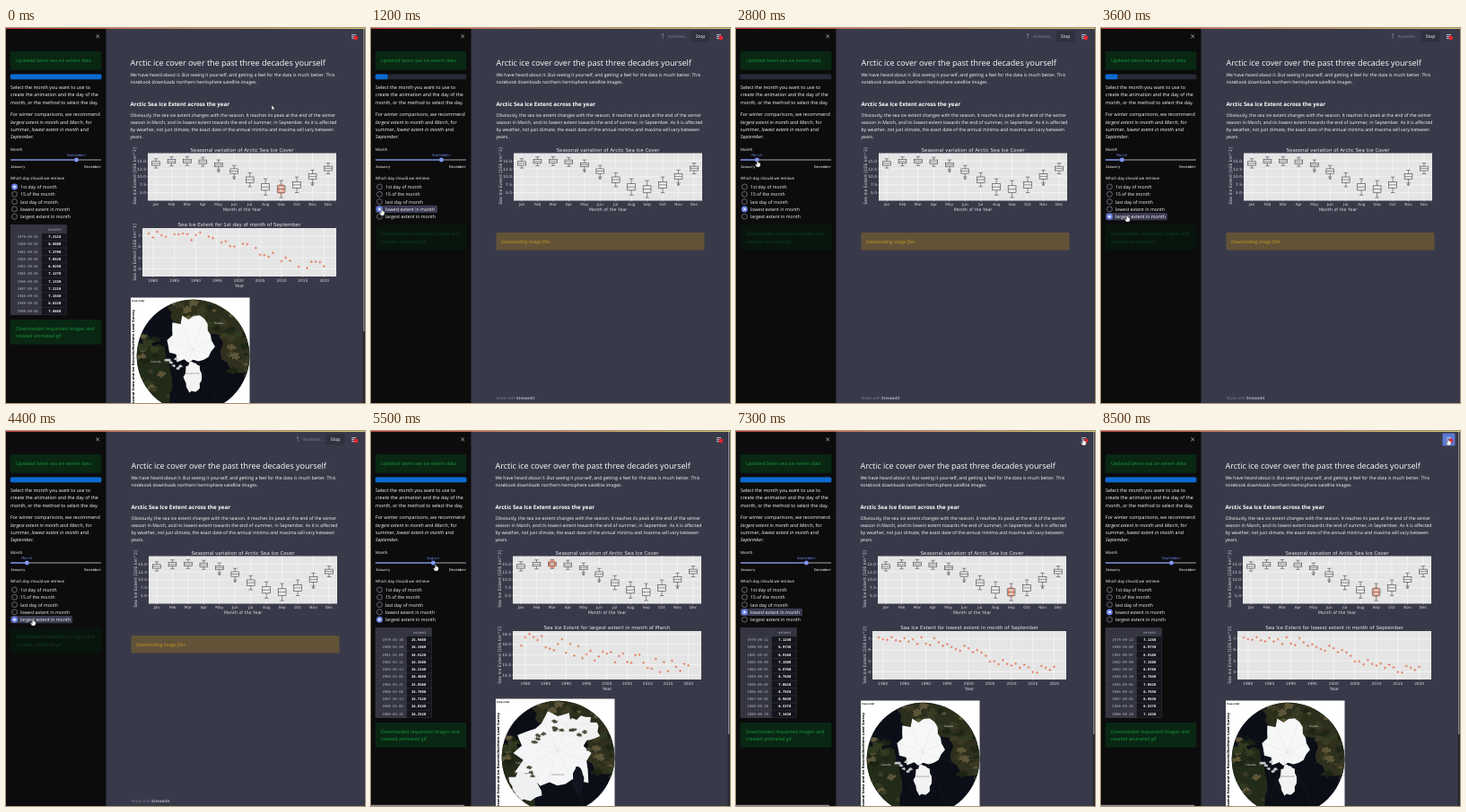
These frames come from a looping animation (400 px wide and 418 px high, 8.6 s). An HTML page with a canvas:

```html
<!DOCTYPE html>
<html lang="en">
<head>
<meta charset="utf-8">
<title>Arctic ice cover</title>
<style>
html, body { margin: 0; width: 100%; height: 100%; overflow: hidden; background: #393a49; }
canvas { display: block; width: 400px; height: 418px; }
</style>
</head>
<body>
<canvas id="stage"></canvas>
<script>
const W = 400, H = 418, LOOP = 8600;
const canvas = document.getElementById('stage');
const dpr = window.devicePixelRatio || 1;
canvas.width = W * dpr;
canvas.height = H * dpr;
const g = canvas.getContext('2d');
g.scale(dpr, dpr);
g.textRendering = 'geometricPrecision';

const SANS = '"Open Sans", "Noto Sans", sans-serif';
const PLOT = '"DejaVu Sans", sans-serif';
const MONO = '"DejaVu Sans Mono", monospace';
const MONTHS = ['January', 'February', 'March', 'April', 'May', 'June', 'July',
  'August', 'September', 'October', 'November', 'December'];
const DAYS = ['1st day of month', '15 of the month', 'last day of month',
  'lowest extent in month', 'largest extent in month'];
const RED = '#e2572f', BLUE = '#7088ee', PALE = '#d8d8de', GREEN = '#1c9a3e', GREEN_BOX = '#092713';

function rand(n, seed = 1) {
  const v = Math.sin(n * 12.9898 + seed * 78.233) * 43758.5453;
  return v - Math.floor(v);
}

// yearly extent: a falling trend with seeded scatter
function series(seed, trend, gaps = 0) {
  const out = [];
  for (let year = 1979; year <= 2020; year++) {
    if (year > 1980 && rand(year, seed + 9) < gaps) continue;
    const day = gaps ? 1 : 1 + Math.floor(rand(year, seed + 5) * 22);
    out.push({ year, day, value: trend(year) + (rand(year, seed) - 0.5) * 0.8 });
  }
  return out;
}

const summer = year => 6.95 - 3 / (1 + Math.exp((2004 - year) / 5));
const winter = year => 16.25 - 1.5 * (year - 1979) / 41;

const SEPTEMBER = { month: 8, left: 152, x80: 163.8, step: 4.77, base: 7, y0: 231.7, unit: 12.2,
  gap: 1, ticks: 4, top: 300.5 };
const SETS = {
  first: { ...SEPTEMBER, day: 0, data: series(3, year => summer(year) + 0.2, 0.2) },
  low: { ...SEPTEMBER, day: 3, data: series(2, summer) },
  high: { month: 2, left: 158, x80: 172, step: 4.54, base: 16.5, y0: 226.5, unit: 22.8,
    gap: 0.5, ticks: 5, top: 298.5, day: 4, data: series(4, winter) }
};

// a phase without a set is loading; lit marks the focused label
const PHASES = [
  { at: 0, set: 'first', day: 0 },
  { at: 1100, day: 3, lit: true },
  { at: 2200, set: 'low', day: 3 },
  { at: 2800, day: 3 },
  { at: 3500, day: 4, lit: true },
  { at: 4600, set: 'high', day: 4 },
  { at: 5600, day: 4 },
  { at: 6400, day: 3, lit: true },
  { at: 7100, set: 'low', day: 3, lit: true },
  { at: 7600, set: 'low', day: 3 }];

// time, x, y
const PATH = [[0, 296, 86], [950, 12, 202], [2200, 12, 202], [2450, 78, 148], [2800, 24, 148],
  [3400, 29, 209], [4500, 30, 210], [5000, 24, 148], [5500, 72, 149], [5700, 79, 149],
  [6100, 31, 203], [6850, 20, 203], [7250, 387, 9], [LOOP, 387, 9]];
// time, month index
const SLIDE = [[0, 8], [2500, 8], [2800, 2], [5000, 2], [5500, 7], [5600, 8], [LOOP, 8]];

function along(keys, t) {
  let i = 0;
  while (i < keys.length - 2 && t >= keys[i + 1][0]) i++;
  const a = keys[i], b = keys[i + 1];
  const p = Math.min(1, (t - a[0]) / (b[0] - a[0]));
  const e = p * p * (3 - 2 * p);
  return a.slice(1).map((v, k) => v + (b[k + 1] - v) * e);
}

function rect(x, y, w, h, color, r = 0) {
  g.fillStyle = color;
  g.beginPath();
  g.roundRect(x, y, w, h, r);
  g.fill();
}

function line(x1, y1, x2, y2, color, w = 0.6) {
  g.strokeStyle = color;
  g.lineWidth = w;
  g.beginPath();
  g.moveTo(x1, y1);
  g.lineTo(x2, y2);
  g.stroke();
}

function disc(x, y, r, color) {
  g.fillStyle = color;
  g.beginPath();
  g.arc(x, y, r, 0, 7);
  g.fill();
}

function ring(x, y, r, color, w) {
  g.strokeStyle = color;
  g.lineWidth = w;
  g.beginPath();
  g.arc(x, y, r, 0, 7);
  g.stroke();
}

// ragged ellipse
function blob(x, y, rx, ry, color, seed, rough = 0.3) {
  const n = 26;
  g.fillStyle = color;
  g.beginPath();
  for (let i = 0; i < n; i++) {
    const a = i / n * Math.PI * 2, k = 1 + (rand(i, seed) - 0.5) * rough;
    g.lineTo(x + Math.cos(a) * rx * k, y + Math.sin(a) * ry * k);
  }
  g.closePath();
  g.fill();
}

function text(s, x, y, size, color = '#fff', font = SANS, align = 'left', style = '') {
  g.font = `${style} ${size}px ${font}`;
  g.fillStyle = color;
  g.textAlign = align;
  g.fillText(s, x, y);
  return g.measureText(s).width;
}

function upright(s, x, y, size, color, style) {
  g.save();
  g.translate(x, y);
  g.rotate(-Math.PI / 2);
  text(s, 0, 0, size, color, PLOT, 'center', style);
  g.restore();
}

// lines of text; asterisks switch italics on and off
function para(lines, x, y, size, gap, color = '#fff') {
  lines.forEach((s, row) => {
    let at = x;
    s.split('*').forEach((part, i) => {
      at += text(part, at, y + row * gap, size, color, SANS, 'left', i % 2 ? 'italic' : '');
    });
  });
}

function sidebar(t, set, day, lit, progress) {
  rect(0, 0, 111.5, H, '#0c0c0d');
  line(100.3, 7.5, 104, 11.2, '#ccc', 0.7);
  line(104, 7.5, 100.3, 11.2, '#ccc', 0.7);
  rect(4.8, 26, 101.6, 20.8, GREEN_BOX, 1.5);
  para(['Updated latest sea ice extent data'], 11, 38.3, 5.3, 0, GREEN);
  rect(4.8, 51.6, 101.6, 5.6, '#262a36', 1.5);
  if (progress > 0) rect(4.8, 51.6, 101.6 * progress, 5.6, '#0a6bd0', 1.5);

  para(['Select the month you want to use to', 'create the animation and the day of the',
    'month, or the method to select the day.'], 5, 68, 5.3, 8.4);
  para(['For winter comparisons, we recommend', '*largest extent in month* and *March*, for',
    'summer, *lowest extent in month* and', '*September.*'], 5, 98.4, 5.3, 8.3);

  text('Month', 5, 136.8, 4.4);
  const [pos] = along(SLIDE, t);
  const month = Math.round(pos), x = 5 + month / 11 * 101;
  line(5, 147, 106, 147, '#a4a6b4', 1);
  line(5, 147, x, 147, BLUE, 1.2);
  disc(x, 147, 2.4, '#8196f4');
  text(MONTHS[month], x, 142.6, 3.9, BLUE, MONO, 'center');
  text('January', 5, 155.8, 3.9, '#fff', MONO);
  text('December', 106, 155.8, 3.9, '#fff', MONO, 'right');

  text('Which day should we retrieve', 5, 168.8, 4.4);
  if (lit) rect(5, 172.8 + day * 8.3, 69, 8.2, '#3a3b50', 1.5);
  const [cx, cy] = along(PATH, t);
  DAYS.forEach((s, i) => {
    const y = 177 + i * 8.3;
    if (i === day) {
      disc(9.5, y, 3.4, BLUE);
      disc(9.5, y, 1.2, '#fff');
    } else {
      const hover = cx < 74 && Math.abs(cy - y) < 4;
      disc(9.5, y, 3.1, hover ? '#44454f' : '#0f0f13');
      ring(9.5, y, 3, '#a0a0a8', 0.6);
    }
    text(s, 16, y + 1.9, 5.15);
  });

  if (set) table(set);
  const y = set ? 325 : 219.5;
  rect(4.8, y, 101.6, 27.7, set ? GREEN_BOX : '#08150c', 1.5);
  para(['Downloaded requested images and', 'created animated gif'], 11, y + 11.8, 5.3, 8.2,
    set ? GREEN : '#11401f');
  if (set && t > 2000) rect(0, 416.8, 104, 1.2, '#8c8c90');
}

function table(set) {
  const two = n => String(n).padStart(2, '0');
  rect(5, 219.5, 62.5, 100.3, '#15161d');
  rect(5, 219.5, 62.5, 9.3, '#343541');
  rect(5, 219.5, 34.5, 100.3, '#343541');
  text('extent', 61.3, 225.7, 3.9, '#b9bac4', MONO, 'right');
  set.data.slice(0, 11).forEach(({ year, day, value }, i) => {
    const y = 232.6 + i * 8.27;
    text(`${year}-${two(set.month + 1)}-${two(day)}`, 12.5, y + 1.4, 3.9, '#b9bac4', MONO);
    text(value.toFixed(3) + '0', 61.3, y + 1.4, 3.9, '#fff', MONO, 'right', 'bold');
    line(5, y - 3.9, 67.5, y - 3.9, '#44454f', 0.35);
  });
  line(39.5, 219.5, 39.5, 319.8, '#44454f', 0.35);
  g.strokeRect(5, 219.5, 62.5, 100.3);
}

function tickY(left, y, label) {
  line(left, y, 368, y, '#fff', 0.5);
  line(left - 1.3, y, left, y, '#ccc', 0.4);
  text(label, left - 2.1, y + 1.5, 4.3, PALE, PLOT, 'right');
}

function tickX(x, top, bottom, label) {
  line(x, top, x, bottom, '#fff', 0.5);
  line(x, bottom, x, bottom + 1.2, '#ccc', 0.4);
  text(label, x, bottom + 5.8, 4.3, PALE, PLOT, 'center');
}

function titles(mid, title, top, label, bottom, middle) {
  text(title, mid, top, 5.5, '#e6e6ea', PLOT, 'center');
  text(label, mid, bottom, 4.85, PALE, PLOT, 'center');
  upright('Sea Ice Extent [1E6 km^2]', 145, middle, 4.7, PALE);
}

function boxPlot(set) {
  const dark = '#33333a';
  rect(158, 139.5, 210, 53, '#e5e5e5');
  for (let i = 0; i < 5; i++) tickY(158, 148.2 + i * 8.83, (15 - i * 2.5).toFixed(1));
  MONTHS.forEach((name, i) => {
    // seasonal cycle: a wave plus its first overtone, widest in late summer
    const a = (i - 7.82) * Math.PI / 6, u = ((1 + Math.cos(a)) / 2) ** 2;
    const mid = 161 + 15.7 * Math.cos(a) + 3 * Math.cos(2 * a);
    const half = 2.1 + 1.7 * u, reach = 5 + 4.5 * u;
    const x = 167 + i * 17.45;
    tickX(x, 139.5, 192.5, name.slice(0, 3));
    for (const s of [-1, 1]) {
      line(x, mid + s * half, x, mid + s * reach, dark, 0.55);
      line(x - 2.2, mid + s * reach, x + 2.2, mid + s * reach, dark, 0.55);
    }
    g.strokeRect(x - 4.4, mid - half, 8.8, half * 2);
    line(x - 4.4, mid, x + 4.4, mid, '#555', 0.6);
    if (['May', 'June', 'November'].includes(name)) ring(x, mid + reach + 1.8, 0.85, '#222', 0.7);
    if (set && i === set.month) {
      for (const s of [-1, 0, 1]) ring(x, mid + s * half * 0.6, 3.4, RED, 0.55);
    }
  });
  titles(263, 'Seasonal variation of Arctic Sea Ice Cover', 137.6, 'Month of the Year', 203.8, 165);
}

function scatter(set) {
  const { left, x80, step, base, y0, unit, gap } = set;
  rect(left, 223, 368 - left, 54, '#e5e5e5');
  for (let i = 0; i < set.ticks; i++) {
    tickY(left, y0 + i * gap * unit, (base - i * gap).toFixed(gap < 1 ? 1 : 0));
  }
  for (let year = 1980; year <= 2020; year += 5) {
    tickX(x80 + (year - 1980) * step, 223, 277, year);
  }
  set.data.forEach(({ year, value }) => {
    const x = x80 + (year - 1980) * step, y = y0 + (base - value) * unit;
    line(x - 1.4, y, x + 1.4, y, RED, 0.65);
    line(x, y - 1.4, x, y + 1.4, RED, 0.65);
  });
  titles((left + 368) / 2, `Sea Ice Extent for ${DAYS[set.day]} of ${MONTHS[set.month]}`, 221.3,
    'Year', 289.4, 250);
}

function globe(set) {
  const cx = 208.5, cy = 365.5;
  rect(139, set.top, 132.5, H - set.top, '#fff');
  text('true color', 140.3, set.top + 4, 2.6, '#000', PLOT, 'left', 'bold');
  upright('Seasonal Snow and Ice Records/Northern Land Survey', 143, 369, 3.6, '#000', 'bold');
  g.save();
  g.translate(0, set.top - 300.5);
  g.beginPath();
  g.arc(cx, cy, 62.8, 0, 7);
  g.clip();
  rect(139, 300, 133, 135, '#0b0d17');
  blob(235, 317, 52, 24, '#2b2e1b', 1);
  blob(262, 352, 22, 32, '#2f2f1d', 2);
  blob(160, 391, 27, 40, '#222a18', 3);
  // mottled land along the rim
  for (let i = 0; i < 64; i++) {
    const asia = i % 3 > 0;
    const a = asia ? -2 + rand(i, 6) * 2.4 : 2.1 + rand(i, 6) * 1.5;
    const d = 40 + rand(i, 7) * 24, size = 2 + rand(i, 8) * 4;
    const tone = ['#1c2414', '#3b3b24', '#5d5538', '#303a20'][i % 4];
    blob(cx + Math.cos(a) * d, cy + Math.sin(a) * d, size, size * 0.7, tone, i, 0.8);
  }
  if (set.month === 2) {
    blob(203, 361, 43, 41, '#f4f5f6', 12, 0.45);
    blob(172, 398, 17, 18, '#eff0f1', 13, 0.5);
    blob(231, 334, 22, 14, '#f1f2f2', 14, 0.6);
    blob(231, 392, 6, 15, '#12151f', 15);
    for (let i = 0; i < 16; i++) {
      const a = 2.2 + rand(i, 21) * 4.2, d = 30 + rand(i, 22) * 12;
      blob(cx + Math.cos(a) * d, cy + Math.sin(a) * d, 3, 1.8, '#4a4c3a', i, 0.9);
    }
  } else {
    blob(206, 348, 24, 26, '#f6f7f7', 31, 0.32);
    blob(208, 389, 9.5, 17, '#f3f3f3', 32, 0.25);
    for (let i = 0; i < 7; i++) blob(179 + i * 2.6, 368 + rand(i, 41) * 12, 2.2, 1.4, '#c9cbca', i, 0.8);
  }
  for (let i = 0; i < 8; i++) {
    const a = i * Math.PI / 4 + 0.35;
    line(208, 358, 208 + Math.cos(a) * 85, 358 + Math.sin(a) * 85, 'rgba(130,135,130,.25)', 0.35);
  }
  text('Russia', 237, 330, 3.2, '#ddd', SANS, 'center');
  text('Canada', 167, 373, 3.2, '#ddd', SANS, 'center');
  text('Greenland', 208, 386, 3, '#777', SANS, 'center');
  g.restore();
}

function toolbar(t, set) {
  if (!set) {
    const a = Math.floor(t / 200) % 4;
    line(324 + a * 0.5, 7, 326 - a * 0.3, 12, '#77788a', 0.8);
    disc(325, 7, 0.9, '#77788a');
    text('RUNNING...', 331, 10.9, 4.1, '#85869a');
    rect(356.5, 3, 21, 12.5, '#30313e', 1.5);
    text('Stop', 367, 11.2, 5, '#fff', SANS, 'center');
  }
  if (t > 8050) rect(380.5, 2.5, 14, 14, '#5c78d2', 1.5);
  for (let i = 0; i < 3; i++) line(385, 7.6 + i * 2, 390, 7.6 + i * 2, '#e8e8ee', 0.8);
  disc(389.8, 11, 2.4, '#e3262e');
}

function page(set) {
  g.save();
  if (!set) g.translate(1, 0);
  text('Arctic ice cover over the past three decades yourself', 138.5, 41.8, 9);
  para(['We have heard about it. But seeing it yourself, and getting a feel for the data is much better. This',
    'notebook downloads northern hemisphere satellite images.'], 138.5, 54.2, 5.08, 8.2);
  text('Arctic Sea Ice Extent across the year', 138.5, 87.2, 6.17, '#fff', SANS, 'left', 'bold');
  para(['Obviously, the sea ice extent changes with the season. It reaches its peak at the end of the winter',
    'season in March, and its lowest extent towards the end of summer, in September. As it is affected',
    'by weather, not just climate, the exact date of the annual minima and maxima will vary between',
    'years.'], 138.5, 98.8, 5.08, 8.2);
  boxPlot(set);
  if (set) {
    scatter(set);
    globe(set);
  } else {
    rect(138.5, 228, 232, 19.5, '#625338', 1.5);
    para(['*Downloading image files*'], 144, 239.8, 5.1, 0, '#c89a24');
    const w = text('Made with ', 138.5, 413.6, 4.4, '#7d7e8e');
    text('Streamlit', 138.5 + w, 413.6, 4.4, '#b3b4c0', SANS, 'left', 'bold');
  }
  g.restore();
  if (set) {
    rect(397.5, 0, 2.5, H, '#282932');
    rect(398.2, 0, 1.1, 338, '#a2a2aa');
  }
}

function pointer(t) {
  const [x, y] = along(PATH, t);
  const hand = (x < 82 && y > 140) || x > 380;
  const shape = hand
    ? 'M-.6 0H.6L.8 2 3 2.6 3.2 5 2.2 7H-1L-2.8 4-2 3.5-.8 4.6Z'
    : 'M0 0V5.2L1.2 4.1 2 6 2.9 5.6 2.1 3.8 3.7 3.7Z';
  const path = new Path2D(shape);
  g.save();
  g.translate(x, y);
  g.fillStyle = '#fff';
  g.strokeStyle = '#222';
  g.lineWidth = 0.4;
  g.fill(path);
  g.stroke(path);
  g.restore();
}

function draw(t) {
  let n = PHASES.length - 1;
  while (t < PHASES[n].at) n--;
  const phase = PHASES[n], set = SETS[phase.set];
  const end = n + 1 < PHASES.length ? PHASES[n + 1].at : LOOP;
  // the bar fills well before loading ends
  const progress = set ? 1 : Math.min(1, (t - phase.at) / (end - phase.at) / 0.68);
  rect(0, 0, W, H, '#393a49');
  page(set);
  sidebar(t, set, phase.day, phase.lit, progress);
  const bar = g.createLinearGradient(0, 0, W, 0);
  bar.addColorStop(0, '#ff4b4b');
  bar.addColorStop(1, '#fffd80');
  rect(0, 0, W, 0.7, bar);
  toolbar(t, set);
  pointer(t);
}

const began = performance.now();
function tick() {
  draw((performance.now() - began) % LOOP);
  requestAnimationFrame(tick);
}
tick();
</script>
</body>
</html>
```
